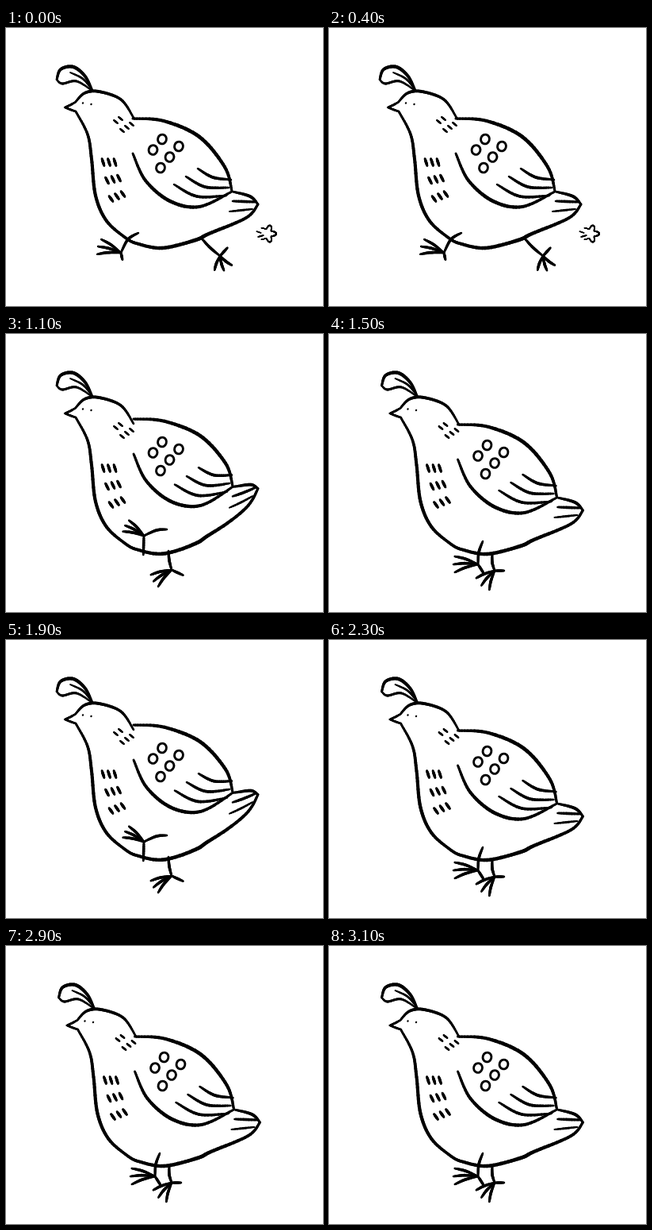
An HTML page with a canvas that plays this animation: 400x350 px, repeating every 3200 ms.

```html
<!DOCTYPE html>
<html lang="en">
<head>
<meta charset="utf-8">
<title>Running quail</title>
<style>
  html, body { margin: 0; width: 100%; height: 100%; overflow: hidden; background: #fff; }
  canvas { display: block; width: 400px; height: 350px; }
</style>
</head>
<body>
<canvas id="stage"></canvas>
<script>
const W = 400, H = 350, FRAME_MS = 100;
const canvas = document.getElementById('stage');
const ctx = canvas.getContext('2d');
const dpr = window.devicePixelRatio || 1;
canvas.width = W * dpr;
canvas.height = H * dpr;

let bend = 0; // how far the rear of the bird curls upwards, 0 to 1

const curl = (x, y) => y - bend * 28 * (Math.max(0, x - 165) / 155) ** 3;

const spline = (a, b, c, d, t) =>
  0.5 * (2 * b + (c - a) * t + (2 * a - 5 * b + 4 * c - d) * t * t + (3 * b - a - 3 * c + d) * t * t * t);

// Brush stroke through key points, thinner at both ends.
function ink(width, ...points) {
  const steps = 10, last = points.length - 1, total = last * steps;
  const key = (i, k) => points[Math.max(0, Math.min(last, i))][k];
  const at = s => {
    const i = Math.min(last - 1, Math.floor(s / steps)), t = s / steps - i;
    const [x, y] = [0, 1].map(k => spline(key(i - 1, k), key(i, k), key(i + 1, k), key(i + 2, k), t));
    return [x, curl(x, y)];
  };
  for (let s = 0; s < total; s++) {
    ctx.lineWidth = width * (0.65 + 0.35 * Math.sin(Math.PI * (s + 0.5) / total));
    ctx.beginPath();
    ctx.moveTo(...at(s));
    ctx.lineTo(...at(s + 1));
    ctx.stroke();
  }
}

function circle(x, y, r) {
  ctx.beginPath();
  ctx.ellipse(x, y, r, r * 1.1, 0.3, 0, 7);
}

function shifted(dx, dy, part) {
  ctx.save();
  ctx.translate(dx, dy);
  part();
  ctx.restore();
}

function head() {
  ink(4.2, [65, 65], [70, 52], [86, 49], [101, 61], [110, 79]);
  ink(3, [65, 65], [72, 70], [90, 67], [110, 79]);
  ink(2.6, [82, 56], [98, 64], [110, 78]);
  ink(2.8, [89, 93], [82, 97], [75, 100]);
  ink(2.8, [75, 100], [83, 103], [89, 105]);
  ink(3.8, [88, 94], [100, 82], [118, 80], [146, 90], [162, 113]);
  for (let i = 0; i < 2; i++) {
    circle(98 + 10.5 * i, 94.5 + 1.5 * i, 1.2);
    ctx.fill();
  }
}

function torso() {
  ink(4.2, [89, 105], [104, 134], [109, 165], [114, 211], [128, 243], [153, 265], [165, 271]);
  ink(4.6, [153, 265], [165, 271], [198, 277], [240, 267], [257, 259], [304, 239], [319, 222]);
  ink(3.8, [319, 222], [309, 212], [287, 206]);
  for (let i = 0; i < 2; i++) {
    ink(3.6 - i * 0.8, [287 - 4 * i, 218 + 13 * i], [316 - 4 * i, 219 + 9 * i]);
  }
}

function wing() {
  ink(4.6, [161, 114], [200, 117], [245, 137], [277, 175], [286, 205]);
  ink(4.4, [161, 158], [177, 192], [208, 218], [245, 225], [286, 206]);
  for (let i = 0; i < 3; i++) {
    ink(3.7, [243 - 15 * i, 177 + 10 * i], [262 - 10 * i, 188 + 12 * i], [285 - 3 * i, 191 + 10 * i]);
  }
}

function spots() {
  ctx.lineWidth = 2.9;
  for (let i = 0; i < 5; i++) {
    const row = i % 2, n = i >> 1;
    circle(219 - 21 * row - 11.5 * n, 149 - 9 * row + 13.5 * n, 5.4);
    ctx.stroke();
  }
}

function flecks() {
  for (let row = 0; row < 3; row++) {
    for (let i = 0; i < 3; i++) {
      const x = 122 + 4.5 * row + 7.5 * i, y = 164.5 + 23.5 * row - 1.5 * row * i;
      ink(3.6, [x, y], [x + 3 + row, y + 9 - row]);
    }
  }
  for (let i = 0; i < 5; i++) {
    const group = i > 1 ? 1 : 0, n = i - 2 * group;
    const x = 137 + 8 * group + 6 * n, y = 116 + 11 * group - 4 * n;
    ink(2.6, [x, y], [x + 5, y + 4]);
  }
}

// A shin ending in three fanned toes and one spur.
function leg({ hip, knee, ankle, aim, spread, toe, spur, spurLength }) {
  const [x, y] = ankle;
  const reach = (angle, r) => [x + r * Math.cos(angle), y + r * Math.sin(angle)];
  ink(3.6, hip, knee, ankle);
  for (let i = -1; i <= 1; i++) {
    const angle = aim + i * spread;
    ink(3.6, ankle, reach(angle + 0.08, toe * 0.55), reach(angle, toe));
  }
  ink(3.6, ankle, reach(spur, spurLength));
}

const legs = {
  reaching: { hip: [167, 258], knee: [154, 266], ankle: [145, 283], aim: 3.41, spread: 0.33, toe: 30, spur: 1.35, spurLength: 9 },
  pushing: { hip: [247, 265], knee: [257, 276], ankle: [270, 287], aim: 1.3, spread: 0.64, toe: 19, spur: -0.83, spurLength: 14 },
  landing: { hip: [194, 261], knee: [189, 275], ankle: [188, 290], aim: 3.14, spread: 0.33, toe: 31, spur: 1, spurLength: 14 },
  under: { hip: [206, 278], knee: [206, 288], ankle: [209, 298], aim: 2.3, spread: 0.46, toe: 25, spur: 0, spurLength: 12 },
  lifted: { hip: [203, 246], knee: [190, 247], ankle: [174, 254], aim: 3.64, spread: 0.3, toe: 27, spur: 1.6, spurLength: 24 },
  planted: { hip: [205, 273], knee: [206, 285], ankle: [209, 297], aim: 2.58, spread: 0.33, toe: 27, spur: 0.43, spurLength: 16 }
};

function puff() {
  const lobes = [];
  for (let a = -2.4; a < 2.5; a += 0.2) {
    const r = 8.5 + 2.5 * Math.cos(5 * a);
    lobes.push([330 + r * Math.cos(a), 259 + r * Math.sin(a)]);
  }
  ink(2, ...lobes);
  ink(1.6, [316, 256], [322, 258]);
  ink(2, [318, 263], [325, 261]);
}

function bird({ x, lift, feet, dust }) {
  shifted(x, 0, () => {
    bend = lift;
    head();
    torso();
    flecks();
    shifted(0, -4 * lift, spots);
    bend = lift / 2;
    shifted(lift, -7 * lift, wing);
  });
  bend = 0;
  const stray = Math.trunc(x / 4) * 4; // feet travel only with a large shift
  shifted(stray, 0, () => feet.forEach(name => leg(legs[name])));
  if (dust) puff();
}

const stride = (x, dust) => ({ x, lift: 0, feet: ['reaching', 'pushing'], dust });
const highStep = { x: -1, lift: 1, feet: ['lifted', 'planted'] };
const lowStep = { x: 1.5, lift: 0, feet: ['landing', 'under'] };

const cycle = [
  stride(-1, true), highStep, stride(-6), highStep,
  stride(-1, true), lowStep, stride(8), lowStep
];

function draw(now) {
  ctx.setTransform(dpr, 0, 0, dpr, 0, 0);
  ctx.fillStyle = '#fff';
  ctx.fillRect(0, 0, W, H);
  ctx.fillStyle = ctx.strokeStyle = '#000';
  ctx.lineCap = ctx.lineJoin = 'round';
  bird(cycle[Math.floor(Math.max(0, now) / FRAME_MS) % cycle.length]);
  requestAnimationFrame(draw);
}
draw(performance.now());
</script>
</body>
</html>
```
